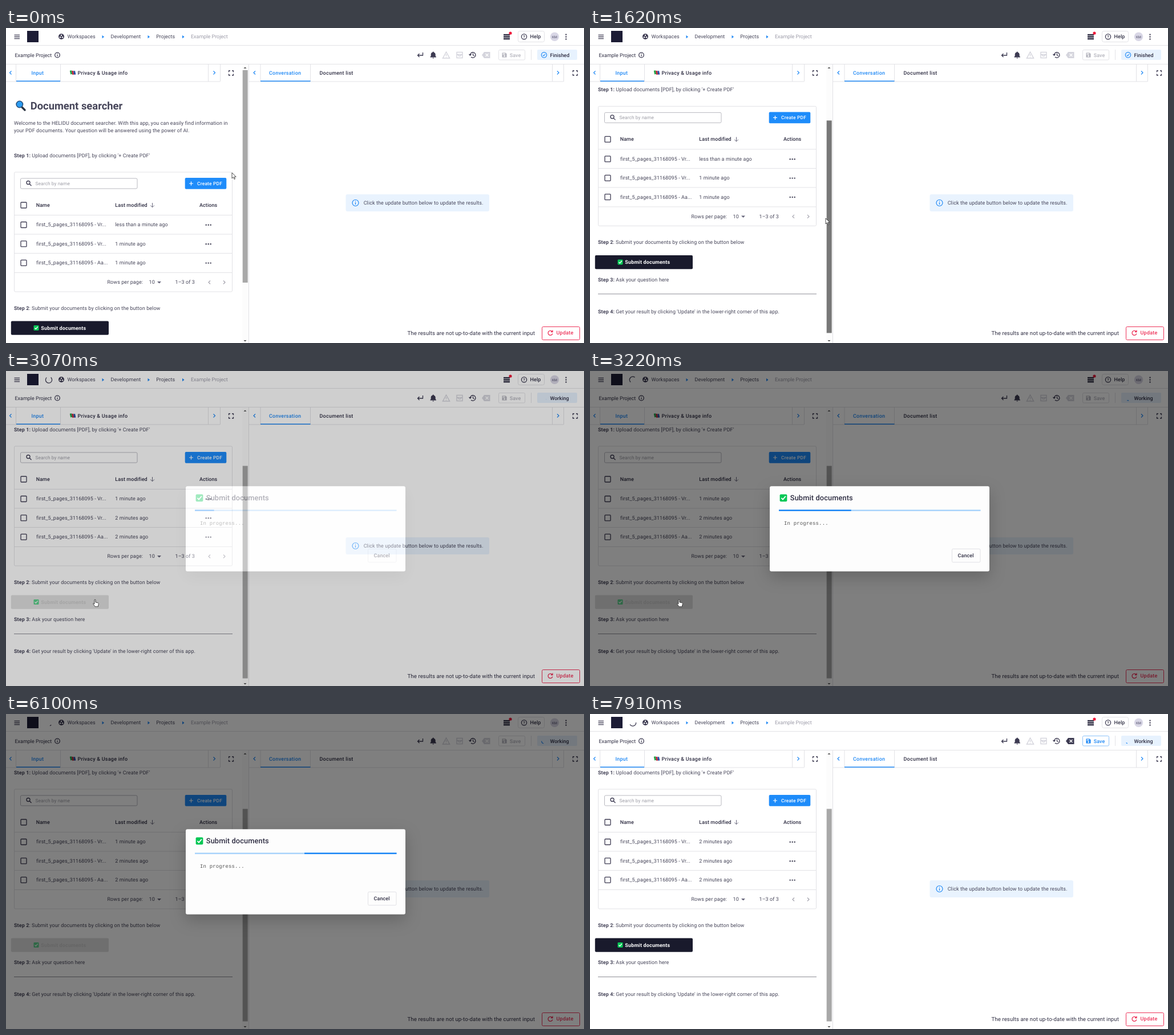
These frames come from a looping animation (1013x553 px, 8000 ms). An HTML page:

```html
<!DOCTYPE html>
<html lang="en">
<head>
<meta charset="utf-8">
<title>Document searcher</title>
<style>
html, body { margin: 0; width: 100%; height: 100%; overflow: hidden; background: #fff; }
svg { display: block; }
text { font: 8.98px Roboto, sans-serif; letter-spacing: .0107em; fill: #47465a; text-rendering: geometricPrecision; white-space: pre; }
.plain { letter-spacing: 0; }
.m { font-weight: 500; fill: #2f2e43; }
.wide { letter-spacing: .0286em; }
.b { font-weight: 700; }
.small { font-size: 8.34px; letter-spacing: .025em; }
.mono { font: 8.98px "Liberation Mono", monospace; letter-spacing: .17px; fill: #555; }
.blue { fill: #1e88f5; }
.line { fill: none; stroke: #e2e2e6; }
.ink { fill: none; stroke: #3d3b52; stroke-width: 1.3; }
.bl { fill: none; stroke: #1e88f5; stroke-width: 1.2; }
#sheet { filter: drop-shadow(0 10px 14px rgba(0, 0, 0, .2)); }
</style>
</head>
<body>
<svg id="stage" width="1013" height="553" viewBox="0 0 1013 553">
<defs>
  <clipPath id="pane"><rect y="95" width="414" height="458"/></clipPath>
  <clipPath id="btnClip"><rect x="9" y="515" width="171" height="24" rx="2"/></clipPath>
  <g id="box"><rect x="-5" y="-5" width="10" height="10" rx="1" class="ink"/></g>
  <g id="dots" fill="#47465a"><circle cx="-4" r="1.2"/><circle r="1.2"/><circle cx="4" r="1.2"/></g>
  <path id="next" d="M-1.5-3L1.5 0l-3 3"/>
  <path id="prev" d="M1.5-3L-1.5 0l3 3"/>
  <path id="full" class="ink" d="M-4-1.5V-4h2.5M1.5-4H4v2.5M4 1.5V4H1.5M-1.5 4H-4V1.5"/>
  <path id="crumb" class="blue" d="M-1.5-2.8L2 0l-3.5 2.8z"/>
  <g id="tick"><rect x="-5" y="-5" width="10" height="10" rx="1.5" fill="#06c755"/><path d="M-2.8 0l2 2.2L3-2.4" fill="none" stroke="#fff" stroke-width="1.5"/></g>
  <g id="okay" fill="none" stroke-width="1.1"><circle r="4.7"/><path d="M-2.2 0l1.6 1.7L2.3-1.6"/></g>
  <g id="disk"><path d="M-4-4h6l2 2v6h-8z"/><path d="M-2.8-2.8h4v1.8h-4z" fill="#fff"/><circle cy="1.6" r="1.4" fill="#fff"/></g>
</defs>
<rect width="1013" height="553" fill="#fff"/>

<!-- top bar -->
<path class="ink" d="M14.5 12.3h9.5M14.5 15.5h9.5M14.5 18.7h9.5"/>
<rect x="37" y="5" width="20" height="20" fill="#1c1c35"/>
<circle cx="97" cy="15" r="5" fill="#3d3b52"/>
<g fill="#fff"><circle cx="97" cy="12.7" r="1.2"/><circle cx="95" cy="16.3" r="1.2"/><circle cx="99" cy="16.3" r="1.2"/></g>
<text class="plain" x="107.4" y="18">Workspaces</text><use href="#crumb" x="170" y="15.5"/>
<text class="plain" x="183.6" y="18">Development</text><use href="#crumb" x="250" y="15.5"/>
<text class="plain" x="263.2" y="18">Projects</text><use href="#crumb" x="310.5" y="15.5"/>
<text class="plain" x="324" y="18" style="fill:#9c9ba8">Example Project</text>
<path d="M872 12h11M872 15.5h11M872 19h11" stroke="#2f2e43" stroke-width="2.4"/>
<circle cx="884" cy="9" r="2.6" fill="#ee1c3c"/>
<rect x="897.5" y="5.5" width="46" height="19" rx="3" class="line"/>
<circle cx="908" cy="15.2" r="4.6" class="ink"/>
<text class="b" x="908" y="17.7" text-anchor="middle" style="font-size:7px">?</text>
<text class="m" x="918.5" y="18">Help</text>
<circle cx="961.5" cy="15.2" r="7.7" fill="#d9d7e6"/>
<text class="m" x="961.5" y="17.5" text-anchor="middle" style="font-size:6px;fill:#6b6982">KM</text>
<use href="#dots" transform="translate(981.5 15.5) rotate(90)"/>
<path class="line" d="M0 30.5h1013M0 63.5h1013"/>

<!-- second bar -->
<text class="plain" x="15.5" y="50.5" style="fill:#2f2e43">Example Project</text>
<circle cx="90" cy="47.5" r="4.3" class="ink"/>
<path class="ink" d="M90 47v2.8M90 45v1"/>
<path class="ink" d="M730.5 43v5h-9M724.5 45l-3 3 3 3"/>
<path d="M743.5 51.5v-1l1.2-1.2v-3a3.8 3.8 0 0 1 2.8-3.6 1.2 1.2 0 0 1 2.4 0 3.8 3.8 0 0 1 2.8 3.6v3l1.2 1.2v1zM747.5 52.3h2.4a1.2 1.2 0 0 1-2.4 0" fill="#3d3b52"/>
<path d="M771.5 42l6 11h-12zM771.5 46v3M771.5 50.5v1" fill="none" stroke="#d5d5dd" stroke-width="1.5"/>
<path d="M790 42.5h10v4h-10zM790 47h2.5l1 2h3l1-2h2.5v5.5h-10z" fill="none" stroke="#d5d5dd" stroke-width="1.4"/>
<path class="ink" d="M813.5 47.5a4.7 4.7 0 1 1 1.5 3.4M811.5 46l2 2 2-2M818.5 44.5v3.2l2.2 1.3"/>
<g id="erase"><path d="M834 47.5l4-5.5h10.5v11H838z"/><path d="M840.5 45l5 5m0-5l-5 5" stroke="#fff" stroke-width="1.3"/></g>
<g id="save"><rect id="saveFrame" x="863.5" y="38.5" width="46" height="17.5" rx="2" fill="none"/><use href="#disk" x="873.5" y="47.5"/><text class="m" x="882.7" y="50.6" style="fill:inherit">Save</text></g>
<path class="line" d="M920.5 38v18"/>
<rect x="931" y="38" width="70" height="18" rx="2" fill="#e7f2fe"/>
<use id="done" href="#okay" x="943" y="47.3" stroke="#1e88f5"/>
<text id="status" class="m plain" x="953.5" y="50.5"></text>

<!-- tab strips -->
<path class="line" d="M0 94h375M425.5 64v489M426 94h551M17.5 64v30M95.5 64v30M354.5 64v30M375.5 64v30M446 64v30M533.5 64v30M957.5 64v30M977.5 64v30"/>
<path d="M18 93.3h77M446 93.3h87.5" stroke="#1e88f5" stroke-width="1.5"/>
<g class="bl"><use href="#prev" x="8" y="78.5"/><use href="#next" x="365" y="78.5"/><use href="#prev" x="435.5" y="78.5"/><use href="#next" x="967.5" y="78.5"/></g>
<use href="#full" x="394.5" y="79"/><use href="#full" x="997.5" y="79"/>
<text class="m wide" x="44.5" y="81.7" style="fill:#1e88f5">Input</text>
<g transform="rotate(-12 117 78)"><rect x="112.500" y="74" width="3.200" height="6.500" fill="#20a94a"/><rect x="115.500" y="75" width="3" height="7" fill="#c0283c"/><rect x="118.500" y="76" width="3" height="6.500" fill="#2450a8"/></g>
<text class="m wide" x="125.5" y="81.7">Privacy &amp; Usage info</text>
<text class="m wide" x="461" y="81.7" style="fill:#1e88f5">Conversation</text>
<text class="m wide" x="549.5" y="81.7">Document list</text>

<!-- scrolling pane -->
<g clip-path="url(#pane)"><g id="content">
  <path d="M27.5 138.5l5.5 5.5" stroke="#2a3340" stroke-width="3.4" stroke-linecap="round"/>
  <circle cx="23.8" cy="134" r="5.7" fill="#2b9cf2" stroke="#27507c" stroke-width="1.6"/>
  <text class="b" x="42.7" y="142.7" style="font-size:18.4px;letter-spacing:0">Document searcher</text>
  <text x="14" y="170.3">Welcome to the HELIDU document searcher. With this app, you can easily find information in</text>
  <text x="14" y="183.2">your PDF documents. Your question will be answered using the power of AI.</text>
  <text x="14" y="226.8"><tspan class="b">Step 1:</tspan> Upload documents [PDF], by clicking '+ Create PDF'</text>
  <rect x="14.5" y="253" width="382" height="210" rx="2" class="line"/>
  <rect x="25.5" y="264" width="204.5" height="18" rx="2" fill="none" stroke="#b9b9c0"/>
  <circle cx="39" cy="271.5" r="3" class="ink"/><path class="ink" d="M41.2 273.7l3.3 3.3"/>
  <text class="small" x="51.5" y="276" style="letter-spacing:.0107em;fill:#9d9da6">Search by name</text>
  <rect x="313.7" y="263" width="72.6" height="19.8" rx="2" fill="#1e8cfa"/>
  <path d="M321 273h7M324.5 269.5v7" stroke="#fff" stroke-width="1.2"/>
  <text class="m small" x="335" y="276" style="fill:#fff">Create PDF</text>
  <use href="#box" x="31" y="311"/>
  <text class="m" x="52.7" y="313.7">Name</text><text class="m" x="191.3" y="313.7">Last modified</text><text class="m" x="339" y="313.7">Actions</text>
  <path d="M256.5 307v7.5M253.2 311.5l3.3 3.3 3.3-3.3" fill="none" stroke="#66657a"/>
  <path class="line" d="M15 328.5h381M15 362h381M15 395.5h381M15 429.5h381"/>
  <g id="rows"></g>
  <text x="177.5" y="449.3">Rows per page:</text><text x="250.5" y="449.3">10</text><text x="296.5" y="449.3">1–3 of 3</text>
  <path d="M265 445l3.5 3.5 3.5-3.5z" fill="#66657a"/>
  <g fill="none" stroke="#a3a2ad" stroke-width="1.2"><use href="#prev" x="356.5" y="446.5"/><use href="#next" x="382.5" y="446.5"/></g>
  <text x="14" y="494.6"><tspan class="b">Step 2</tspan>: Submit your documents by clicking on the button below</text>
  <rect id="submit" x="8.8" y="514.6" width="171.2" height="24.2" rx="2"/>
  <circle id="ripple" cx="156" cy="523" fill="#fff" opacity=".14" clip-path="url(#btnClip)"/>
  <g id="submitLabel"><use href="#tick" transform="translate(53 526.5) scale(.9)"/><text class="b" x="61.3" y="529.5" style="fill:inherit;letter-spacing:.02em">Submit documents</text></g>
  <text x="14" y="560.3"><tspan class="b">Step 3:</tspan> Ask your question here</text>
  <path d="M14 582.5h383" stroke="#8d8d95"/>
  <text x="14" y="616.3"><tspan class="b">Step 4:</tspan> Get your result by clicking 'Update' in the lower-right corner of this app.</text>
</g></g>
<rect x="414" y="65" width="11" height="488" fill="#fcfcfc"/>
<path d="M416.5 71l2.5-2.5 2.5 2.5zM416.5 548l2.5 2.5 2.5-2.5z" fill="#505050"/>
<rect id="thumb" x="414.7" width="9" height="373"/>

<!-- result pane -->
<rect x="595.5" y="292" width="251.5" height="30" rx="3" fill="#e9f3fe"/>
<circle cx="612.5" cy="307" r="5.5" class="bl"/><path class="bl" d="M612.5 306v4M612.5 303.5v1.2"/>
<text x="626.7" y="310">Click the update button below to update the results.</text>
<text x="703.5" y="538.8" style="font-size:9.63px;fill:#2f2e43;letter-spacing:.09px">The results are not up-to-date with the current input</text>
<rect x="939.5" y="524.5" width="66" height="23" rx="2" fill="none" stroke="#ee3158"/>
<path d="M957.3 533a4 4 0 1 0 .6 3.5M958 530.5v3h-3" fill="none" stroke="#ee3158" stroke-width="1.3"/>
<text class="m wide" x="964.5" y="538.3" style="fill:#ee3158">Update</text>

<circle id="spinTop" r="5.6" class="ink" pathLength="127"/>
<circle id="spinStatus" r="4.3" class="bl" pathLength="127"/>

<!-- modal -->
<g id="modal">
  <rect width="1013" height="553" opacity=".5"/>
  <g id="dialog">
    <rect id="sheet" x="315" width="385" rx="3" fill="#fdfdfd"/>
    <use href="#tick" transform="translate(339 20.5) scale(1.27)"/>
    <text class="m" x="350.8" y="25" style="font-size:12.83px;letter-spacing:.0075em">Submit documents</text>
    <rect x="331" y="41.2" width="353.5" height="2.5" fill="#a9d4fb"/>
    <rect id="bar1" y="41.2" height="2.5" class="blue"/><rect id="bar2" y="41.2" height="2.5" class="blue"/>
    <text class="mono" x="340" y="67.5">In progress...</text>
    <g id="message"><use href="#okay" x="347" y="81" stroke="#2e8b3a"/><text class="mono" x="359.5" y="84.3" style="fill:#2e8b3a">Document succesfully embedded!</text></g>
    <g id="cancel"><rect x="634.5" y="-39.5" width="49.5" height="23.5" rx="2" class="line"/><text class="m" x="644.5" y="-24.8">Cancel</text></g>
  </g>
</g>
<g id="pointer" stroke="#222" stroke-width=".8" fill="#fff">
  <path id="arrow" d="M0 0v10l2.4-2.2 1.7 3.8 1.5-.7-1.6-3.6h3.2z"/>
  <path id="hand" d="M-1 .8q1-1.6 2 0v4.2l4.5 1.1q1 .3.9 1.6l-.9 3.3v1.7h-5.500l-3-4.500q-.8-1.500.6-1.200l1.400 1.100z"/>
</g>
</svg>
<script>
const $ = id => document.getElementById(id);
const set = (id, attrs) => { for (const k in attrs) $(id).setAttribute(k, attrs[k]); };
const show = (id, on) => set(id, { display: on ? 'inline' : 'none' });
const clamp = v => Math.max(0, Math.min(1, v));
const mod = (a, n) => ((a % n) + n) % n;

const bezier = (x1, y1, x2, y2) => x => {
  const at = (a, b, s) => 3 * (1 - s) ** 2 * s * a + 3 * (1 - s) * s * s * b + s ** 3;
  let lo = 0, hi = 1;
  for (let i = 0; i < 18; i++) {
    const s = (lo + hi) / 2;
    if (at(x1, x2, s) < x) lo = s; else hi = s;
  }
  return at(y1, y2, lo);
};
const easeInOut = bezier(.42, 0, .58, 1);
const easeBar1 = bezier(.65, .815, .735, .395);
const easeBar2 = bezier(.165, .84, .44, 1);

// keys: [time, value, value...], linear between
const track = (keys, t) => {
  const i = keys.findIndex(k => k[0] > t);
  if (i < 0) return keys[keys.length - 1].slice(1);
  if (!i) return keys[0].slice(1);
  const a = keys[i - 1], b = keys[i], f = (t - a[0]) / (b[0] - a[0]);
  return a.slice(1).map((v, j) => v + (b[j + 1] - v) * f);
};

$('rows').innerHTML = ['Vr...', 'Vr...', 'Aa...'].map((name, i) => {
  const y = 345.5 + 33.4 * i;
  return `<use href="#box" x="31" y="${y}"/><text x="53" y="${y + 2.8}">first_5_pages_31168095 - ${name}</text>
    <text id="age${i}" x="191.3" y="${y + 2.8}"></text><use href="#dots" x="354.7" y="${y + .3}"/>`;
}).join('');

const PRESS = 2830, OPEN = 3000, EMBED = 6700, CLOSE = 7560;
const scrollKeys = [[700, 0], [1200, 37], [1650, 121]];
const pointerKeys = [[120, 396, 254], [600, 419, 246], [700, 419, 246], [1200, 413, 275], [1650, 413, 338],
  [2190, 203, 400], [2640, 156, 401], [3450, 156, 401], [3920, 430, 466], [4860, 467, 484], [5010, 468, 533]];

// arc that grows, then shrinks, once per period
function spin(id, x, y, t, period, angle) {
  const p = mod(t / period, 1);
  const grow = easeInOut(clamp(p * 2)), slide = easeInOut(clamp(p * 2 - 1));
  const start = 15 * grow + 110 * slide;
  const length = Math.min(1 + 99 * grow, 127 - start);
  set(id, { transform: `translate(${x} ${y}) rotate(${angle - 90})`, 'stroke-dasharray': `0 ${start} ${length} 300` });
}

function bar(id, t, ease, from, to, reach) {
  const q = ease(clamp(mod(t, 2100) / 1260));
  const left = clamp(from + (to - from) * q), right = clamp(reach * q);
  set(id, { x: 331 + 353.5 * left, width: 353.5 * Math.max(0, right - left) });
}

function draw(t) {
  const opened = t >= OPEN, closed = t >= CLOSE, embedded = t >= EMBED, busy = opened && !closed;

  const [scroll] = track(scrollKeys, t);
  set('content', { transform: `translate(0 ${-scroll})` });
  set('thumb', { y: 74 + scroll * .765, fill: t > 620 && t < 1680 ? '#787878' : '#a8a8a8' });

  const ages = embedded ? [2, 2, 2] : opened ? [1, 2, 2] : [0, 1, 1];
  ages.forEach((n, i) => $('age' + i).textContent = n ? `${n} minute${n > 1 ? 's' : ''} ago` : 'less than a minute ago');

  const hover = t >= 2300 && !opened;
  set('submit', { fill: busy ? '#e0e0e0' : hover ? '#10111d' : '#191a2c',
    style: hover ? 'filter:drop-shadow(0 2px 3px rgba(0,0,0,.3))' : '' });
  set('submitLabel', { fill: busy ? '#bdbdbd' : '#fff', opacity: busy ? .6 : 1 });
  set('ripple', { r: t > PRESS && !opened ? 16 * clamp((t - PRESS) / 120) : 0 });

  set('erase', { fill: closed ? '#3d3b52' : '#d5d5dd' });
  set('save', { fill: closed ? '#1e88f5' : '#b4b4bd' });
  set('saveFrame', { stroke: closed ? '#8cc2f9' : '#e2e2e6' });
  $('status').textContent = opened ? 'Working' : 'Finished';
  show('done', !opened);
  show('spinTop', opened);
  show('spinStatus', opened);
  spin('spinTop', 75, 15.5, t - 4900, 1330, 63 + (t - 7250) / 664 * 360);
  if (closed) spin('spinStatus', 943, 47.5, t - 7750, 1400, 150 + (t - 7750) / 1400 * 360);
  else spin('spinStatus', 943, 47.5, t - 7250, 1400, 160 + (t - 3220) / 1400 * 360);

  const fade = clamp((t - OPEN) / 190) * (1 - clamp((t - CLOSE) / 195));
  show('modal', fade > 0);
  set('modal', { opacity: fade });
  const height = embedded ? 168 : 149.5;
  set('dialog', { transform: `translate(0 ${embedded ? 193.2 : 202.3})` });
  set('sheet', { height });
  set('cancel', { transform: `translate(0 ${height})` });
  show('message', embedded);
  const run = embedded ? t - 5829 : t - 3020;
  bar('bar1', run, easeBar1, -.35, 1, 1.9);
  bar('bar2', run - 1150, easeBar2, -2, 1.07, 1.08);

  const [x, y] = track(pointerKeys, t), over = t >= 2300 && t < 3500;
  set('pointer', { transform: `translate(${x} ${y})` });
  show('pointer', t < 5100);
  show('arrow', !over);
  show('hand', over);
}

function loop() {
  draw(performance.now() % 8000);
  requestAnimationFrame(loop);
}
loop();
</script>
</body>
</html>
```
